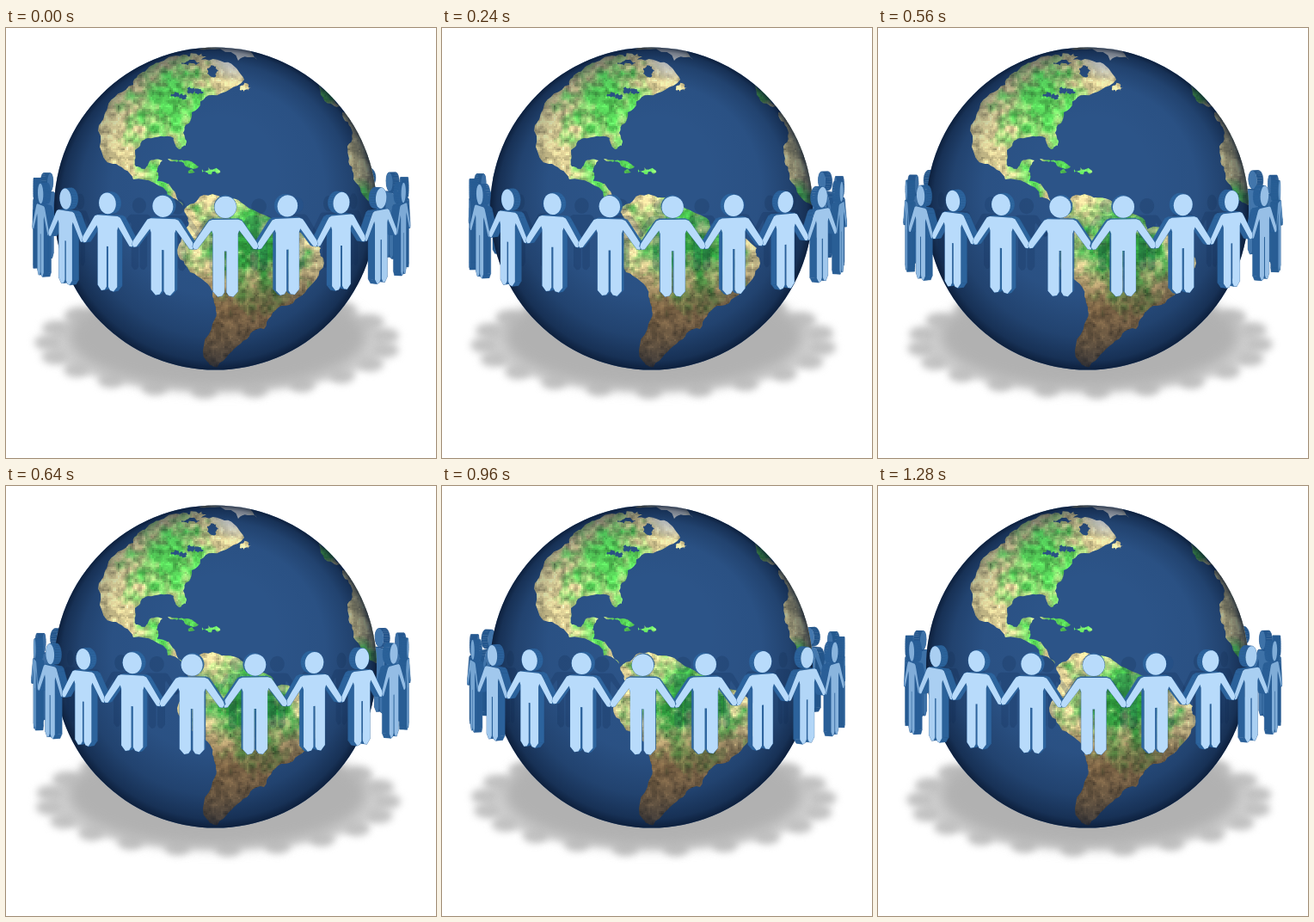
Animation of 500 by 500 pixels, one loop 1360 ms. Source, as an HTML page with a canvas:

```html
<!DOCTYPE html>
<html lang="en">
<head>
<meta charset="utf-8">
<title>People around the globe</title>
<style>
html, body { margin: 0; width: 100%; height: 100%; overflow: hidden; background: #fff; }
canvas { display: block; width: 500px; height: 500px; }
</style>
</head>
<body>
<canvas id="stage" width="500" height="500"></canvas>
<script>
const ctx = document.getElementById('stage').getContext('2d');
const TAU = 2 * Math.PI;
const COUNT = 21, STEPS = 17, STEP_MS = 80, GAP = TAU / COUNT;
const GLOBE = { x: 243.5, y: 210, r: 187.5 };
const UNIT = 244, CAMERA = 8, TILT = 28;
const FRONT = 0.013, BACK = -0.027;

const clamp = v => Math.max(0, Math.min(1, v));
const lerp = (a, b, k) => a.map((v, i) => v + (b[i] - v) * k);
const rgb = c => `rgb(${c.map(Math.round)})`;

function hash(i, j) {
  const v = Math.sin(i * 127.1 + j * 311.7) * 43758.5453;
  return v - Math.floor(v);
}

function noise(x, y) {
  const i = Math.floor(x), j = Math.floor(y);
  const ease = t => t * t * (3 - 2 * t);
  const u = ease(x - i), v = ease(y - j);
  const top = hash(i, j) * (1 - u) + hash(i + 1, j) * u;
  const low = hash(i, j + 1) * (1 - u) + hash(i + 1, j + 1) * u;
  return top * (1 - v) + low * v;
}

const fbm = (x, y) => (4 * noise(x, y) + 2 * noise(2 * x, 2 * y) + noise(4 * x, 4 * y)) / 7;

function trace(g, pts) {
  pts.forEach(([x, y], i) => i ? g.lineTo(x, y) : g.moveTo(x, y));
  g.closePath();
}

function fillShape(g, pts) {
  g.beginPath();
  trace(g, pts);
  g.fill();
}

const pairs = text => text.split(' ').map(p => p.split(',').map(Number));

const oval = (x, y, rx, ry, n = 24) => Array.from({ length: n }, (_, i) =>
  [x + rx * Math.cos(i * TAU / n), y + ry * Math.sin(i * TAU / n)]);

// Jagged coast: split every edge and push the midpoint sideways.
function rough(pts, amp = 0.35, depth = 3) {
  if (!depth) return pts;
  const out = pts.flatMap(([x, y], i) => {
    const [nx, ny] = pts[(i + 1) % pts.length];
    const k = (hash(x, y) - 0.5) * amp;
    return [[x, y], [(x + nx) / 2 - (ny - y) * k, (y + ny) / 2 + (nx - x) * k]];
  });
  return rough(out, amp, depth - 1);
}

const island = (x, y, rx, ry) => rough(oval(x, y, rx, ry, 7), 0.8, 2);

const coasts = [
  '186,36 218,36 254,40 277,60 240,78 216,98 206,122 209,137 203,141 195,128 165,128 150,142 151,161 161,164 166,157 182,154 175,167 176,178 189,181 206,207 188,197 148,176 124,158 108,113 118,93 148,66 164,48',
  '207,211 240,193 270,200 306,220 313,234 366,256 369,268 350,304 320,323 300,350 273,367 246,394 234,388 243,338 240,312 214,284 199,258 210,232',
  '391,98 410,106 436,150 436,206 424,203 404,176 398,148 403,122',
  '362,62 380,78 394,98 378,88',
  '224,25 244,20 264,21 292,37 270,38',
  '188,152 210,154 224,161 208,160'
].map(t => rough(pairs(t)));

const lushSpots = [[195, 95, 56], [174, 176, 32], [220, 160, 40], [284, 248, 62], [412, 197, 18], [372, 76, 20]];

function landColor(x, y) {
  const ice = clamp(1.6 - Math.hypot(x - 266, y - 27) / 22);
  const wet = Math.max(...lushSpots.map(([cx, cy, r]) => 1.25 - Math.hypot(x - cx, y - cy) / r));
  const south = clamp((y - 265) / 60);
  const dry = lerp([229, 214, 154], [132, 104, 68], south);
  const lush = lerp(lerp([88, 212, 88], [48, 158, 62], clamp((y - 190) / 60)), [84, 124, 58], south);
  const k = clamp(wet + (fbm(x / 13, y / 13) - 0.5) * 1.8);
  const light = 0.62 + 0.78 * fbm(x / 5 + 50, y / 5);
  return lerp(lerp(dry, lush, k).map(v => Math.min(255, v * light)), [250, 250, 248], ice);
}

function makeGlobe() {
  const c = document.createElement('canvas');
  c.width = c.height = 500;
  const g = c.getContext('2d');
  const { x, y, r } = GLOBE;
  const ocean = '#2c5488';
  g.arc(x, y, r, 0, TAU);
  g.clip();
  g.fillStyle = ocean;
  g.fillRect(0, 0, 500, 500);

  g.save();
  g.beginPath();
  [...coasts, island(238, 166, 11, 4), island(215, 167, 4, 2), island(278, 70, 7, 4), island(218, 33, 15, 4)]
    .forEach(p => trace(g, p));
  g.clip();
  for (let py = 20; py < 400; py += 2) {
    for (let px = 100; px < 440; px += 2) {
      g.fillStyle = rgb(landColor(px, py));
      g.fillRect(px, py, 2, 2);
    }
  }
  g.restore();

  g.fillStyle = ocean;
  for (let i = 0; i < 4; i++) fillShape(g, island(197 + 9 * i, 78 - 3 * i + 5 * (i % 2), 5, 3.5));
  fillShape(g, island(240, 50, 7, 7));
  fillShape(g, island(214, 41, 11, 2.5));

  const shade = g.createRadialGradient(250, 165, 60, x, y, r);
  [[0, 0], [0.5, 0.05], [0.78, 0.27], [0.94, 0.55], [1, 0.82]]
    .forEach(([at, a]) => shade.addColorStop(at, `rgba(6,20,44,${a})`));
  g.fillStyle = shade;
  g.fillRect(0, 0, 500, 500);
  return c;
}

// One paper person, in pixels around the centre of the head
const half = pairs('15,14.5 19,16 22,20 37,42 38,46 36,49 32.5,48.5 16,27 14.5,31 14.5,98 9,104 4,103 1.3,99 1.3,51');
const body = [...half, ...half.map(([x, y]) => [-x, y]).reverse()];
const head = oval(0, 0, 12.7, 12.7);

function project(a, [px, py], w) {
  const r = 1 + w, u = px / UNIT;
  const x = r * Math.sin(a) + u * Math.cos(a);
  const z = r * Math.cos(a) - u * Math.sin(a);
  const s = (CAMERA - 1) / (CAMERA - z);
  return [250 + s * UNIT * x, 210 + s * (py - 30 + TILT * z)];
}

function person(a) {
  const c = Math.cos(a), outside = c > 1 / CAMERA;
  const side = rgb(lerp([31, 78, 130], [46, 102, 160], clamp(0.5 + c / 2)));
  const face = rgb(outside
    ? lerp([70, 125, 180], [184, 219, 251], clamp(c * 1.4))
    : lerp([45, 93, 146], [69, 122, 176], clamp(0.5 - c)));
  for (const shape of [body, head]) {
    const near = shape.map(p => project(a, p, FRONT));
    const far = shape.map(p => project(a, p, BACK));
    ctx.fillStyle = ctx.strokeStyle = side;
    ctx.lineWidth = 0.4;
    near.forEach((p, i) => {
      const j = (i + 1) % near.length;
      fillShape(ctx, [p, near[j], far[j], far[i]]);
      ctx.stroke();
    });
    ctx.fillStyle = face;
    fillShape(ctx, outside ? near : far);
  }
}

function shadow(angles) {
  ctx.save();
  ctx.filter = 'blur(4px)';
  ctx.fillStyle = '#d2d2d2';
  fillShape(ctx, oval(246, 366, 198, 56, 60));
  ctx.fillStyle = '#c2c2c2';
  angles.forEach(a => {
    const b = a - 0.1;
    fillShape(ctx, oval(246 + 198 * Math.sin(b), 366 + 56 * Math.cos(b), 15, 9));
  });
  ctx.filter = 'blur(8px)';
  ctx.fillStyle = '#b1b1b1';
  fillShape(ctx, oval(246, 358, 174, 62, 60));
  ctx.restore();
}

// Faint mirror images of the ring on the polished ball
function reflections(angles) {
  for (const a of angles.filter(a => Math.cos(a) > 0.1)) {
    const b = 0.87 * a, c = Math.cos(b);
    const x = GLOBE.x + 184 * Math.sin(b);
    const lit = clamp(1 - Math.abs(Math.abs(x - 230) - 114) / 18);
    ctx.save();
    ctx.translate(x, 195 + 13 * c);
    ctx.scale(0.72 * c, 0.72);
    ctx.fillStyle = 'rgba(14,38,76,0.2)';
    fillShape(ctx, body);
    fillShape(ctx, head);
    ctx.fillStyle = `rgba(42,104,176,${0.45 * lit})`;
    fillShape(ctx, head);
    ctx.restore();
  }
}

const globe = makeGlobe();

function draw(ms) {
  const step = Math.floor(ms / STEP_MS) % STEPS;
  const start = 0.021 + GAP * step / STEPS;
  const angles = Array.from({ length: COUNT }, (_, i) => start + (i - 10) * GAP)
    .map(a => a > Math.PI ? a - TAU : a)
    .sort((a, b) => Math.cos(a) - Math.cos(b));
  ctx.fillStyle = '#fff';
  ctx.fillRect(0, 0, 500, 500);
  shadow(angles);
  angles.filter(a => Math.cos(a) < 0).forEach(person);
  ctx.drawImage(globe, 0, 0);
  reflections(angles);
  angles.filter(a => Math.cos(a) >= 0).forEach(person);
}

let begin = null;
function tick(now) {
  if (begin === null) begin = now;
  draw(now - begin);
  requestAnimationFrame(tick);
}
draw(0);
requestAnimationFrame(tick);
</script>
</body>
</html>
```
